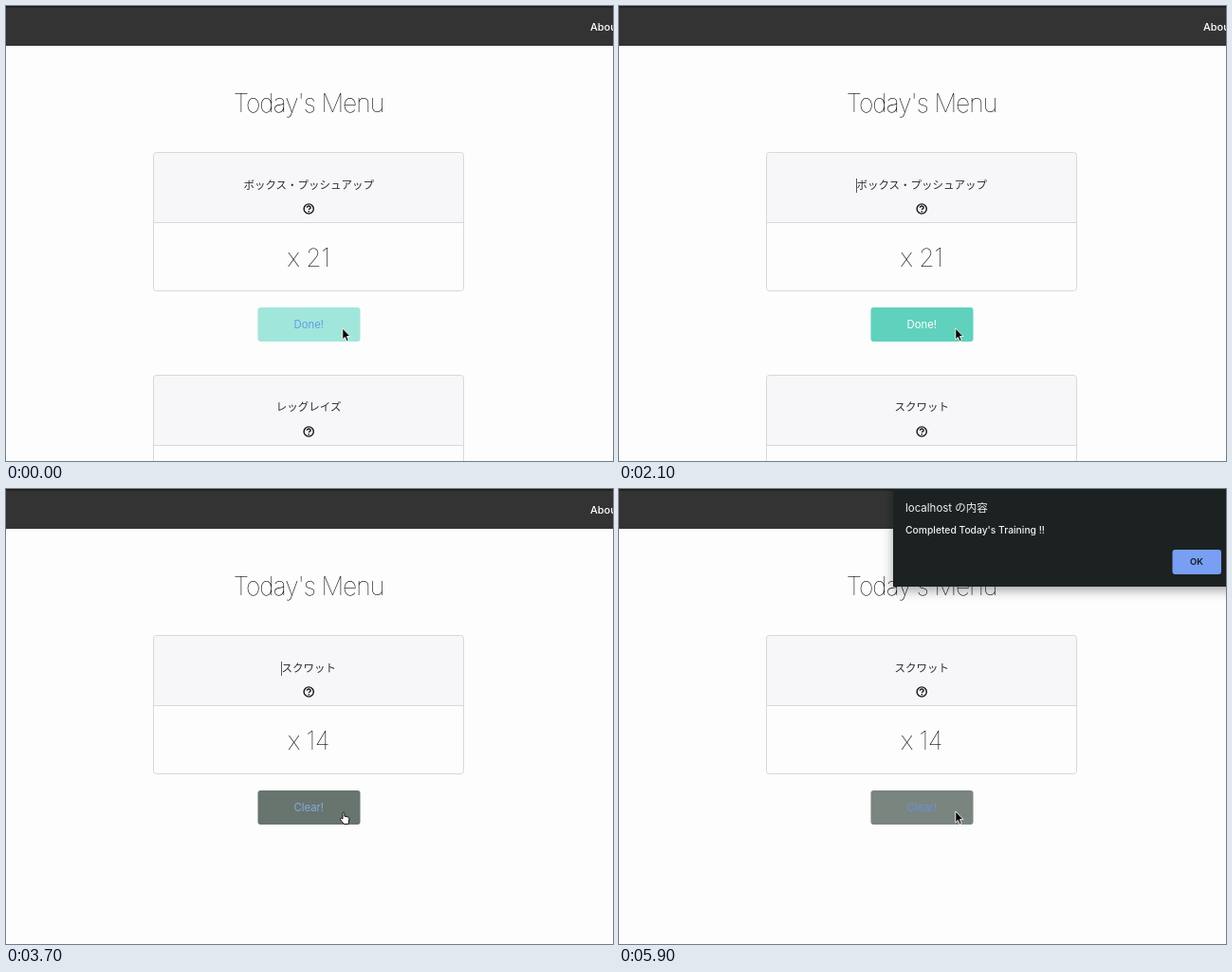
Animation, 640 px wide and 480 px high, one loop 6 s. Source, as an HTML page:

```html
<!DOCTYPE html>
<html lang="ja">
<head>
<meta charset="utf-8">
<title>Today's Menu</title>
<style>
  html, body { margin: 0; width: 100%; height: 100%; overflow: hidden; background: #fdfdfd; }
  svg { display: block; width: 640px; height: 480px; }
  text { font-family: Inter, "Noto Sans CJK JP", "Noto Sans CJK", sans-serif; fill: #2c2c2c; }
  .mid { text-anchor: middle; }
  .big { font-size: 26.5px; font-weight: 100; fill: #000; }
  .heading { letter-spacing: -1px; }
  .count { letter-spacing: -.5px; }
  .name { font: 11.5px "Noto Sans CJK JP", "Noto Sans CJK", "Noto Sans", sans-serif; }
  .label { font-size: 11.3px; font-weight: 400; }
  .dialog text { fill: #f1f1f2; }
  .dialog .ok { fill: #17191c; font-size: 9.5px; font-weight: 600; }
</style>
</head>
<body>
<svg viewBox="0 0 640 480">
  <defs>
    <filter id="shadow" x="-20%" y="-20%" width="140%" height="150%">
      <feDropShadow dx="0" dy="4" stdDeviation="6" flood-color="#000" flood-opacity=".35"/>
    </filter>
    <g id="card">
      <rect x="155.5" y=".5" width="327" height="146" rx="3" fill="#fdfdfd"/>
      <path d="M155.5 74V3.5a3 3 0 0 1 3-3h321a3 3 0 0 1 3 3V74z" fill="#f7f7fa"/>
      <path d="M156 74.5h326" stroke="#d8d8da"/>
      <rect x="155.5" y=".5" width="327" height="146" rx="3" fill="none" stroke="#d8d8da"/>
      <g fill="none" stroke="#151515" stroke-width="1.4">
        <circle cx="319.2" cy="60" r="5.1"/>
        <path d="M317.4 58.8c0-2.5 3.7-2.3 3.7 0 0 1.2-1.8 1.2-1.8 2.3"/>
        <path d="M319.3 62v1.4"/>
      </g>
    </g>
  </defs>

  <rect width="640" height="480" fill="#fdfdfd"/>
  <rect width="640" height="42" fill="#333"/>
  <rect width="640" height="1.5" fill="#1d1d1d"/>
  <text x="616" y="26" style="fill:#fff;font-size:11px;font-weight:500">About</text>
  <text class="mid big heading" x="319" y="112">Today's Menu</text>

  <use href="#card" y="154"/>
  <text id="first" class="mid name" x="319.2" y="193"></text>
  <path id="caret" stroke="#555"/>
  <text id="count" class="mid big count" x="319" y="275"></text>

  <rect id="button" x="265.5" y="318" width="108" height="36" rx="3"/>
  <text id="label" class="mid label" x="319.3" y="340"></text>

  <g id="next">
    <use href="#card" y="389"/>
    <text id="second" class="mid name" x="319.2" y="427.3"></text>
  </g>

  <path id="arrow" d="M354.8 340v11.8l2.6-2.4 1.8 4.2 2-.9-1.8-4.1h3.6z"
    fill="#000" stroke="#fff" stroke-width=".9" stroke-linejoin="round"/>
  <path id="hand" d="M355 347.8v-5.6c0-1.5 1.9-1.5 1.9 0v3l3.2.7c1.4.3 1.8 1 1.7 2.2l-.7 5.4h-4.8l-3.7-4.6c-.7-1.3.8-2 1.6-1.1z"
    fill="#fff" stroke="#111" stroke-width="1" stroke-linejoin="round"/>

  <g id="dialog" class="dialog">
    <rect x="289" y="-10" width="370" height="113" fill="#1f2123" filter="url(#shadow)"/>
    <text x="302" y="24" style="font-size:11.5px">localhost の内容</text>
    <text x="302" y="47.3" style="font-size:10.3px;font-weight:500">Completed Today's Training !!</text>
    <rect x="583.5" y="64" width="51.5" height="26" rx="3" fill="#789ff4"/>
    <text class="mid ok" x="609" y="80.4">OK</text>
  </g>
</svg>
<script>
const LOOP = 6000, STEP = 100;
const PUSH = 'ボックス・プッシュアップ', LEGS = 'レッグレイズ', SQUAT = 'スクワット';
const TEAL = { rest: [95, 209, 188], hover: [162, 230, 218], link: [104, 154, 230] };
const GRAY = { rest: [33, 58, 48], hover: [122, 133, 127], link: [103, 146, 222] };
const WHITE = [255, 255, 255];

const pages = [
  { at: -500, first: PUSH, count: 21, second: LEGS, caret: 250.5, tone: TEAL, label: 'Done!' },
  { at: 600, first: LEGS, count: 14, second: PUSH, caret: 284.5, tone: TEAL, label: 'Done!' },
  { at: 2000, first: PUSH, count: 21, second: SQUAT, caret: 250.5, tone: TEAL, label: 'Done!' },
  { at: 3400, first: SQUAT, count: 14, second: '', caret: 290.5, tone: GRAY, label: 'Clear!' }
];
const caretOn = [[600, 1100], [1600, 2500], [3000, 4000]];

const $ = id => document.getElementById(id);
const clamp = v => Math.max(0, Math.min(1, v));
const within = (t, [a, b]) => t >= a && t < b;
const mix = (a, b, k) => `rgb(${a.map((v, i) => Math.round(v + (b[i] - v) * k))})`;
const show = (id, on) => $(id).style.display = on ? '' : 'none';
const write = (id, s) => { if ($(id).textContent !== s) $(id).textContent = s; };

function draw(t) {
  const page = pages.filter(p => p.at <= t).pop();
  write('first', page.first);
  write('second', page.second);
  write('count', 'x ' + page.count);
  write('label', page.label);
  show('next', page.second);

  // The button eases into its hover look shortly after each page load.
  const hover = 1 - (1 - clamp((t - page.at - 100) / 500)) ** 3;
  $('button').setAttribute('fill', mix(page.tone.rest, page.tone.hover, hover));
  $('label').style.fill = mix(WHITE, page.tone.link, hover);

  $('caret').setAttribute('d', `M${page.caret} 182v15`);
  show('caret', caretOn.some(span => within(t, span)));

  const pointing = within(t, [3400, 4500]);
  show('hand', pointing);
  show('arrow', !pointing);

  $('dialog').style.opacity = clamp((t - 4900) / 200);
}

function tick() {
  const t = performance.now() % LOOP;
  draw(Math.floor(t / STEP) * STEP);
  requestAnimationFrame(tick);
}
tick();
</script>
</body>
</html>
```
